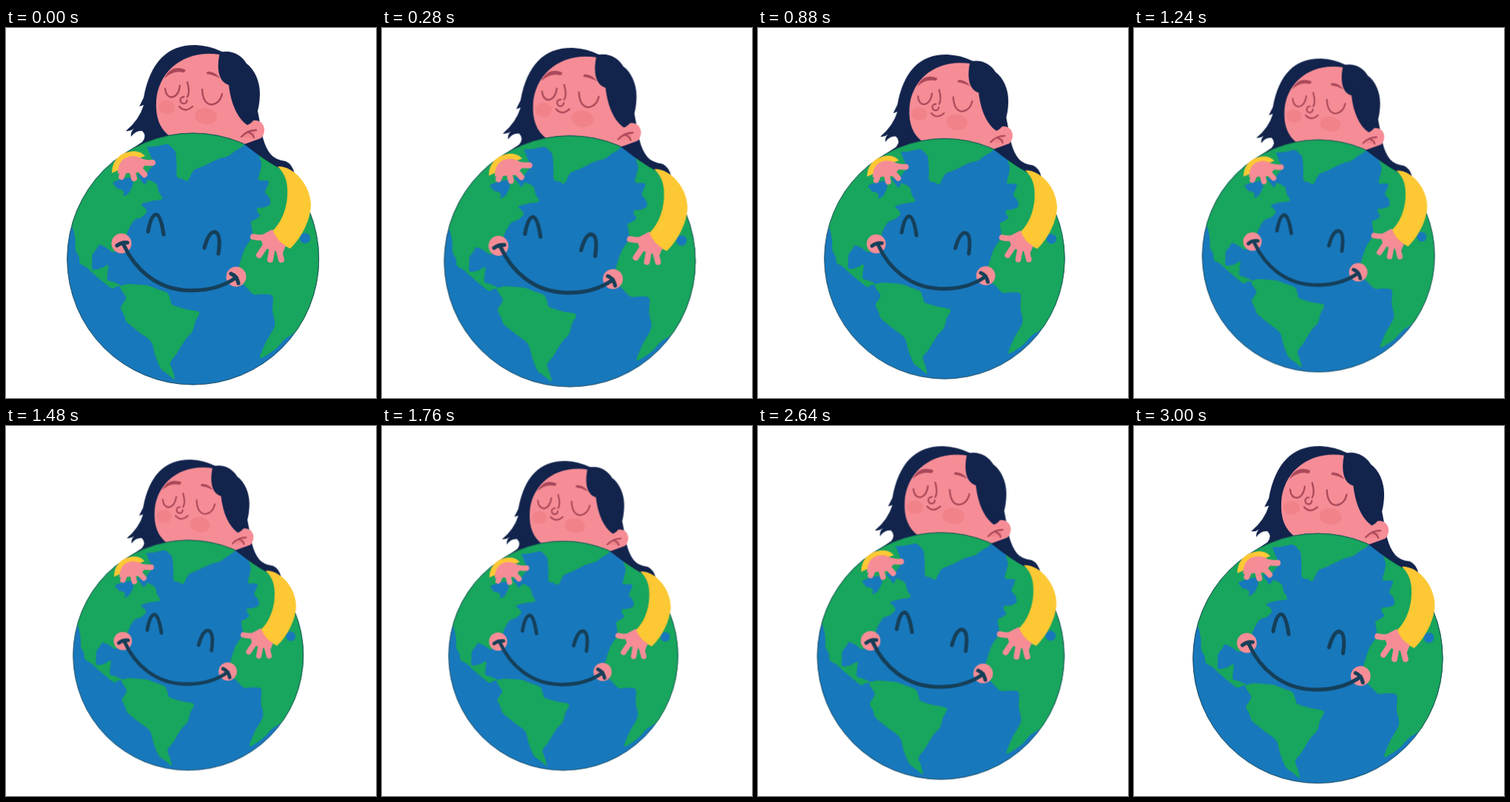
Recreate the animation shown at these times as an HTML page. Size 500x500 px, loop 3.04 s.

```html
<!DOCTYPE html>
<html lang="en">
<head>
<meta charset="utf-8">
<title>Hugging the Earth</title>
<style>
  html, body { margin: 0; width: 100%; height: 100%; overflow: hidden; background: #fff; }
  svg { display: block; width: 100vw; height: 100vh; }
  .hair { fill: #12234c; }
  .skin { fill: #f68d96; }
  .land { fill: #18a55d; }
  .sea { fill: #1878bc; }
  .sleeve { fill: #fcc834; }
  .blush { fill: #f1828a; }
  .brow { fill: #a9485a; }
  .rim { fill: none; stroke: #173a45; stroke-width: .8; }
  .line, .smile, .fingers { fill: none; stroke-linecap: round; stroke-linejoin: round; }
  .line { stroke: #a9485a; stroke-width: 2.3; }
  .smile { stroke: #153f59; stroke-width: 5.2; }
  .fingers { stroke: #f68d96; stroke-width: 8; }

  /* One shared squeeze and drift */
  #hug {
    transform-origin: 252.7px 312px;
    animation: hug 3040ms linear infinite;
  }
  @keyframes hug {
    0%      { transform: none; }
    9.21%   { transform: translate(1.1px, 3.2px) scale(.998); }
    18.42%  { transform: translate(1.9px, 3px) scale(.983); }
    40.79%  { transform: translate(-3.5px, -4px) scale(.923); animation-timing-function: cubic-bezier(.3, .5, .6, 1); }
    57.89%  { transform: translate(-7.7px, -1.5px) scale(.911); animation-timing-function: cubic-bezier(.4, .2, .7, .7); }
    73.68%  { transform: translate(-6.7px, -2px) scale(.94); }
    86.84%  { transform: translate(-5.7px, -1.2px) scale(.981); }
    98.68%, 99.99% { transform: translate(-4.3px, 2px) scale(.9925); }
    100%    { transform: none; }
  }
</style>
</head>
<body>
<svg viewBox="0 0 500 500">
  <defs>
    <clipPath id="disc"><circle cx="252.7" cy="312" r="170.3"/></clipPath>
  </defs>
  <g id="hug">
    <!-- hair behind -->
    <path class="hair" d="M257 23C219 22 195 45 186 94L180 106L186 104Q180 124 162 139Q168 140 173 136Q168 140 169 147Q175 138 184 139Q191 146 184 154L152 175L220 210L340 200L347 148L330 60Q325 40 292 32Q276 24 257 23Z"/>

    <!-- face -->
    <path class="skin" d="M290 36C241 28 206 58 203 98C200 145 230 159 280 160L326 158L326 126L303 76Z"/>
    <path class="skin" d="M322 131C333 121 347 123 349 136C350 148 339 157 322 158Z"/>
    <path class="blush" d="M318 147Q327 138 337 138L335 148Z"/>
    <path class="hair" d="M289 33C304 29 318 36 325 48C336 56 343 72 343 88C343 105 339 127 326 131C313 122 304 103 301 77C285 72 285 50 289 33Z"/>
    <ellipse class="blush" cx="217" cy="107" rx="11" ry="9.5"/>
    <ellipse class="blush" cx="270" cy="119" rx="15" ry="11" transform="rotate(8 270 119)"/>
    <g class="line">
      <path d="M215 82Q216 93 224 93.500Q233 92 235 78"/>
      <path d="M265 83Q266 103 278 103.500Q289 102 292 89"/>
      <path d="M245 73Q249 87 245 93"/>
      <circle cx="240" cy="97.500" r="4.500" stroke-dasharray="21 8"/>
      <path d="M234 106Q242 115 252 106"/>
      <path d="M318 147Q326 138 338 138M328 141Q334 143 335 148"/>
    </g>
    <path class="brow" d="M214 68Q223 49 242 56Q243 60 239 60Q226 57 214 68ZM271 62Q271 58 275 59Q284 60 289 68Q280 63 271 62Z"/>

    <!-- globe -->
    <g clip-path="url(#disc)">
      <circle class="sea" cx="252.7" cy="312" r="172"/>
      <path class="land" data-rough="1.5" data-keys="322,157 300,173 276,182 254,192 245,207 231,201 229,168 218,157 191,161 150,165 190,120 322,120"/>
      <path class="land" data-rough="2" data-keys="170,150 190,161 195,172 199,185 187,203 204,212 211,231 183,238 190,249 173,260 160,290 145,303 126,293 117,306 117,326 138,320 137,340 155,348 143,352 118,332 100,318 94,300 90,270 70,240 110,170"/>
      <path class="land" data-rough="1" data-keys="154,349 165,346 192,348 218,358 225,374 261,384 252,410 236,431 222,452 228,475 209,460 196,424 163,397 155,378 162,364"/>
      <path class="land" data-rough="2.5" data-keys="341,160 345,183 341,205 355,207 350,222 357,238 340,243 343,254 331,262 333,282 320,305 312,337 335,360 360,362 363,402 343,446 366,432 388,413 450,360 450,230 400,160"/>
      <path class="sea" d="M144 209Q155 203 168 202Q175 209 169 217Q166 226 158 227Q163 218 150 217ZM177 198Q188 198 191 207L187 212Z"/>
      <circle class="sea" cx="404" cy="284" r="7"/>
    </g>
    <circle class="rim" cx="252.7" cy="312" r="170"/>

    <!-- hair over the shoulder -->
    <path class="hair" d="M322 157L347 148Q351 163 358 171Q364 178 378 180Q387 184 390 197L370 190Q348 178 322 157Z"/>

    <!-- smiling face of the globe -->
    <circle class="skin" cx="156" cy="291" r="13.500"/>
    <circle class="skin" cx="311" cy="336" r="13.500"/>
    <g class="smile">
      <path d="M192 275Q196 252 203 252Q209 253 213 279"/>
      <path d="M268 297Q274 275 282 275.500Q291 277 287 305"/>
      <path d="M159 293C174 326 204 353 246 354.500C272 355.500 293 350 311 337"/>
      <path d="M150 294Q156 289 164 290M304 332Q312 335 314 345"/>
    </g>

    <!-- left arm -->
    <path class="sleeve" d="M143 196C143 181 152 171 163 168C173 165 182 166 188 173L168 180L152 192Z"/>
    <path class="skin" d="M151 197Q151 174 172 173Q185 174 190 183L180 195Z"/>
    <path class="fingers" d="M175 178Q188 183 198 182M173 182L187 198M168 182L173 203M163 184L156 201"/>

    <!-- right arm -->
    <path class="sleeve" d="M367 187C389 186 411 212 412 238C412 259 399 284 384 298Q369 292 357 277C373 264 382 240 380 215C379 202 374 194 367 187Z"/>
    <path class="skin" d="M360 272Q366 288 378 294L374 304L348 297L343 281Z"/>
    <path class="fingers" d="M357 281Q345 285 334 282M356 286L342 307M361 291L357 313M367 293L372 313"/>
  </g>
</svg>
<script>
  // Seeded random numbers between -1 and 1
  let seed = 7;
  const rand = () => (seed = seed * 16807 % 2147483647) / 1073741823.5 - 1;

  // Put a slightly displaced point between each pair of key points
  function roughen(keys, rough) {
    return keys.flatMap((p, i) => {
      const next = keys[(i + 1) % keys.length];
      return [p, p.map((v, k) => (v + next[k]) / 2 + rand() * rough)];
    });
  }

  // Turn a closed list of points into a smooth outline
  function outline(pts) {
    const at = i => pts[(i + pts.length) % pts.length];
    const handle = (p, a, b, sign) => p.map((v, k) => v + sign * (b[k] - a[k]) / 7);
    return 'M' + pts[0] + pts.map((p, i) => {
      const next = at(i + 1);
      return 'C' + [handle(p, at(i - 1), next, 1), handle(next, p, at(i + 2), -1), next].join(' ');
    }).join('') + 'Z';
  }

  document.querySelectorAll('[data-keys]').forEach(el => {
    const keys = el.dataset.keys.split(' ').map(p => p.split(',').map(Number));
    el.setAttribute('d', outline(roughen(keys, +el.dataset.rough)));
  });
</script>
</body>
</html>
```
